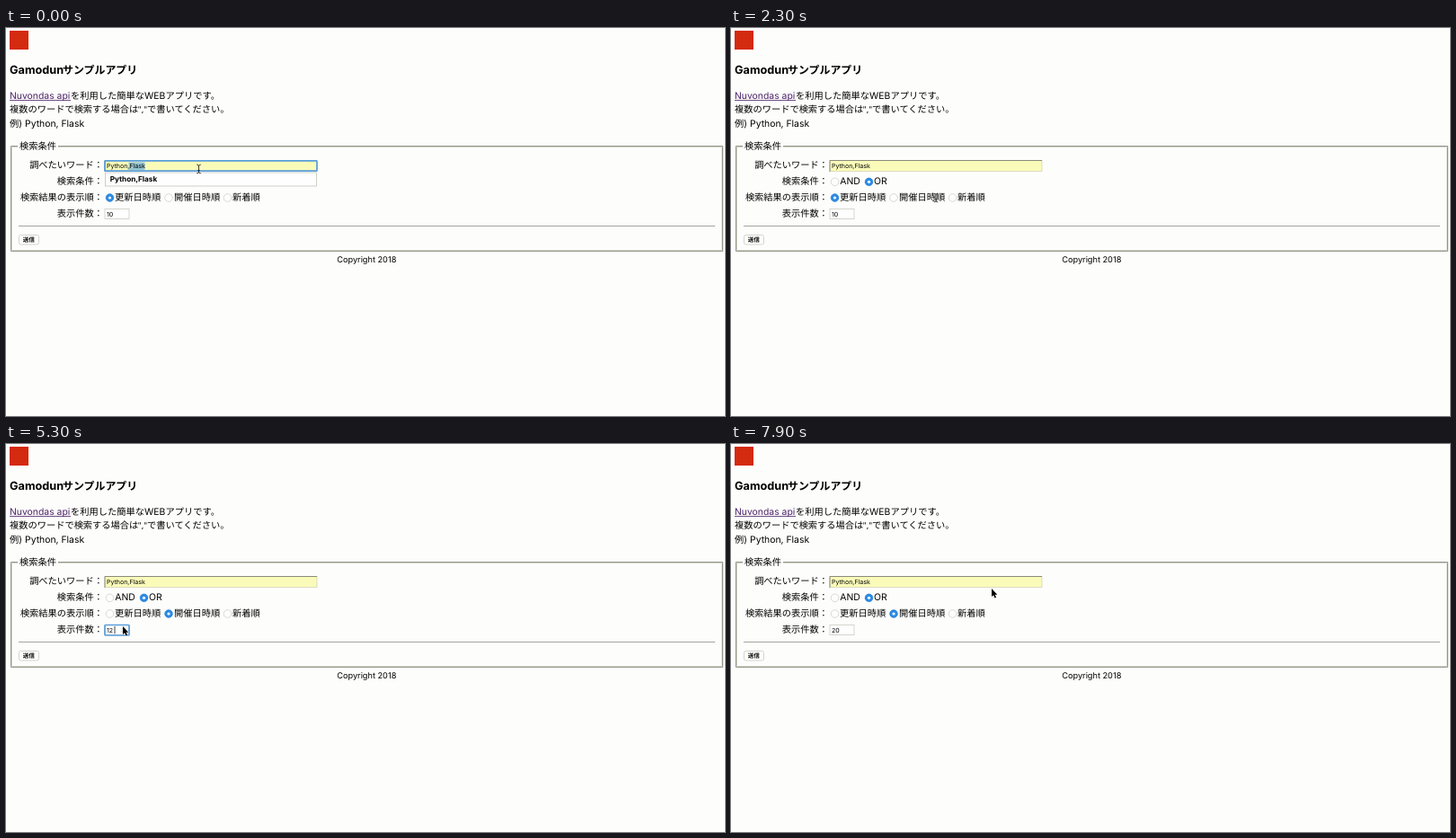
Write an HTML page that moves like this. It is 800 by 432 pixels and loops after 8 s.

```html
<!DOCTYPE html>
<html lang="ja">
<head>
<meta charset="utf-8">
<style>
html, body { margin: 0; width: 100%; height: 100%; overflow: hidden; background: #fdfdfc; }
svg { display: block; width: 800px; height: 432px; }
text { font: 10.24px Inter, "Noto Sans CJK JP", "Noto Sans CJK", sans-serif; fill: #000; text-rendering: geometricPrecision; white-space: pre; }
.label { text-anchor: end; }
.latin { font-size: 10.4px; }
.bold { font-weight: 700; }
.field { font-size: 7.04px; }
.ring { fill: none; stroke: #5a9edb; stroke-width: 1.7; }
.line { fill: none; stroke: #111; stroke-width: .8; }
.radio circle:first-child { fill: #fefefe; stroke: #c8c8c2; stroke-width: .7; }
.radio circle:last-child { fill: none; }
.radio.on circle:first-child { fill: #2a8ce6; stroke: #2278cc; }
.radio.on circle:last-child { fill: #fff; }
</style>
</head>
<body>
<svg viewBox="0 0 800 432">
  <rect x="4" y="3" width="21" height="21" fill="#d42a10"/>

  <text class="bold" x="4" y="51" style="font-size:12.7px">Gamodun</text>
  <text class="bold" x="63" y="51" style="font-size:11.95px">サンプルアプリ</text>
  <text class="latin" x="4" y="79" style="fill:#4d2268">Nuvondas api</text>
  <path d="M4 80.5H72" stroke="#4d2268" stroke-width=".8"/>
  <text x="72" y="79">を利用した簡単な</text>
  <text class="latin" x="154" y="79">WEB</text>
  <text x="177.5" y="79">アプリです。</text>
  <text x="4" y="94">複数のワードで検索する場合は</text>
  <text x="146.8" y="94" style="font-family:'Noto Sans',sans-serif;font-size:9.5px">","</text>
  <text x="157" y="94">で書いてください。</text>
  <text x="4" y="110">例)</text>
  <text class="latin" x="21" y="110">Python, Flask</text>

  <path d="M13 131.5H5.5V248.5H797.5V131.5H58" fill="none" stroke="#96968a"/>
  <path d="M13 132.5H6.5V247.5H796.5V132.5H58" fill="none" stroke="#d2d2c6"/>
  <text x="15" y="135">検索条件</text>

  <text class="label" x="108" y="156">調べたいワード：</text>
  <text class="label" x="108" y="174">検索条件：</text>
  <text class="label" x="108" y="192">検索結果の表示順：</text>
  <text class="label" x="108" y="209.5">表示件数：</text>

  <rect x="110" y="147.5" width="236" height="12" fill="#fafbb9" stroke="#d6d6b4" stroke-width=".8"/>
  <path d="M110 160V147.5H346" fill="none" stroke="#8a8a7c"/>
  <rect id="selection" x="136.5" y="149.5" width="18" height="8.5" fill="#94c5d2"/>
  <text class="field" x="112" y="156.2">Python,Flask</text>
  <g id="wordFocus"><rect class="ring" x="110" y="147.8" width="236" height="11.4" rx="1"/></g>
  <path id="wordCaret" class="line" d="M155.3 149.5V158"/>

  <g id="radios"></g>
  <text class="latin" x="121.3" y="174">AND</text>
  <text class="latin" x="159" y="174">OR</text>
  <text x="121" y="192">更新日時順</text>
  <text x="187" y="192">開催日時順</text>
  <text x="252" y="192">新着順</text>

  <rect x="110" y="201.5" width="27" height="11" fill="#fefefe" stroke="#cdcdc2" stroke-width=".8"/>
  <text class="field" id="count" x="112" y="209.6">10</text>
  <g id="countFocus">
    <rect x="127.5" y="203" width="7" height="8.5" rx="1.5" fill="#f4f4ee"/>
    <path d="M129 206L131 204 133 206M129 208.5L131 210.5 133 208.5" fill="none" stroke="#77776c" stroke-width=".8"/>
    <path class="line" d="M121 203V211.3"/>
    <rect class="ring" x="110" y="201.5" width="27" height="11.5" rx="1"/>
  </g>

  <path d="M14 220.5H789" stroke="#a4a4a0"/>
  <rect x="14.5" y="230.5" width="22" height="10.5" rx="2" fill="#fefefe" stroke="#cbcbc0" stroke-width=".8"/>
  <text class="field" x="18.7" y="238.4" style="font-weight:700;font-size:6.6px">送信</text>
  <text x="401.3" y="261" text-anchor="middle" style="font-size:9.2px">Copyright 2018</text>

  <g id="popup">
    <rect x="110.5" y="161" width="235" height="15" fill="#fefefe" stroke="#c4c4bc" stroke-width=".8"/>
    <text class="bold" x="115.7" y="171" style="font-size:8.2px">Python,Flask</text>
  </g>

  <g id="cursor">
    <path id="arrow" d="M0 0V9L2 7.2 3.6 10.4 5.1 9.7 3.6 6.7H6.3Z" fill="#000" stroke="#fff" stroke-width=".8" paint-order="stroke"/>
    <path id="beam" class="line" d="M-2.2-4.8Q0-4.8 0-3.2V3.2Q0 4.8-2.2 4.8M2.2-4.8Q0-4.8 0-3.2M0 3.2Q0 4.8 2.2 4.8M-1.2 1.6H1.2"/>
  </g>
</svg>
<script>
const LOOP = 8000, STEP = 100;
const $ = id => document.getElementById(id);
const show = (id, on) => $(id).style.display = on ? '' : 'none';
const within = (t, a, b) => t >= a && t < b;

// Pointer path: time, x, y
const path = [
  [0, 214.5, 157], [700, 214.5, 157], [1400, 155, 172], [1800, 155, 172],
  [2300, 228, 189], [2800, 181, 189], [3200, 181, 189], [4100, 134, 205],
  [4400, 130, 203], [6500, 130, 203], [6900, 61, 218], [7200, 28, 236],
  [7500, 28, 236], [7900, 290, 161], [8000, 290, 161]
];

const radios = [[115.5, 171.3], [153.5, 171.3], [115.5, 189], [181, 189], [246.5, 189]];
$('radios').innerHTML = radios.map(([x, y]) =>
  `<g class="radio" transform="translate(${x} ${y})"><circle r="4.3"/><circle r="1.6"/></g>`).join('');
const dots = [...document.querySelectorAll('.radio')];

function pointer(t) {
  const i = path.findIndex(p => p[0] > t);
  const [t0, x0, y0] = path[i - 1], [t1, x1, y1] = path[i];
  const u = (t - t0) / (t1 - t0), e = u * u * (3 - 2 * u);
  return [x0 + (x1 - x0) * e, y0 + (y1 - y0) * e];
}

function countAt(t) {
  if (t < 4800) return 10;
  if (t < 5400) return t < 5100 ? 11 : 12;
  return Math.min(20, 13 + Math.floor((t - 5400) / 125));
}

function draw(t) {
  show('popup', t < 600);
  show('selection', t < 600);
  show('wordFocus', t < 1800);
  show('wordCaret', within(t, 600, 1800));
  show('countFocus', within(t, 4300, 7500));
  $('count').textContent = countAt(t);

  const picked = [t < 1800 ? 0 : 1, t < 3000 ? 2 : 3];
  dots.forEach((d, i) => d.classList.toggle('on', picked.includes(i)));

  const beam = t < 900 || within(t, 2100, 2600) || within(t, 3900, 4300);
  show('beam', beam);
  show('arrow', !beam);
  $('cursor').setAttribute('transform', `translate(${pointer(t)})`);
}

function tick() {
  draw(Math.floor(performance.now() % LOOP / STEP) * STEP);
  requestAnimationFrame(tick);
}
tick();
</script>
</body>
</html>
```
